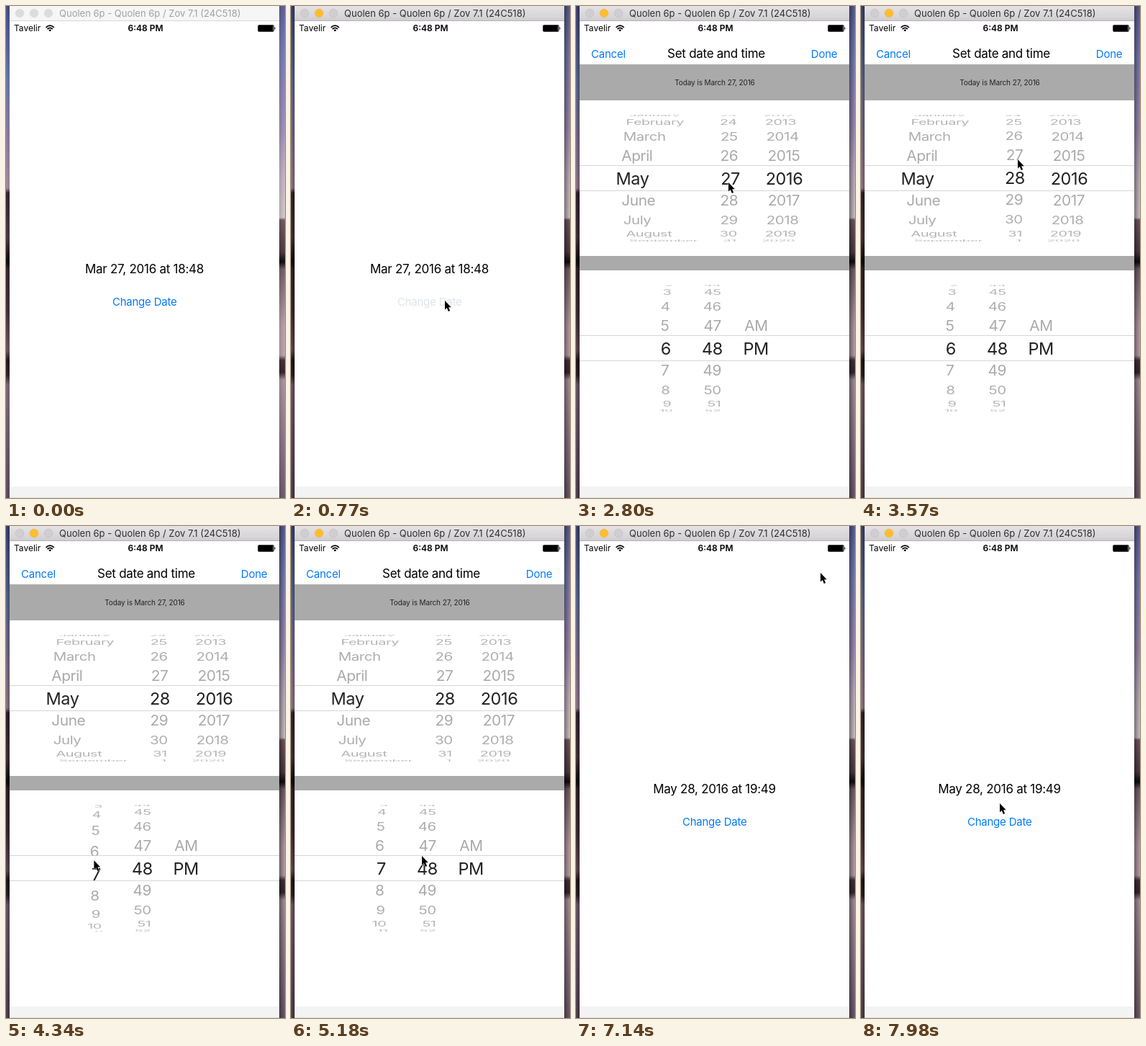
An HTML page that plays this animation: 388 px wide and 683 px high, repeating every 8000 ms.

```html
<!DOCTYPE html>
<html lang="en">
<head>
<meta charset="utf-8">
<title>Date and time picker</title>
<style>
  html, body { margin: 0; width: 100%; height: 100%; overflow: hidden; background: #fff; }
  svg { display: block; width: 388px; height: 683px; }
  text { font-family: Inter, Roboto, sans-serif; }
  .body { font-size: 17px; letter-spacing: -.27px; }
  .link { font-size: 15px; letter-spacing: -.22px; fill: #007aff; }
  .mid { text-anchor: middle; }
  .row { font-size: 21px; letter-spacing: -.45px; fill: #a8a8a8; }
  .picked { font-size: 23.5px; letter-spacing: -.4px; fill: #222; }
</style>
</head>
<body>
<svg viewBox="0 0 388 683">
  <defs>
    <linearGradient id="leftSky" x2="0" y2="1">
      <stop offset="0" stop-color="#4f5793"/>
      <stop offset=".15" stop-color="#7486bd"/>
      <stop offset=".27" stop-color="#a08bb4"/>
      <stop offset=".37" stop-color="#bb9bb0"/>
      <stop offset=".38" stop-color="#3a2a36"/>
      <stop offset=".47" stop-color="#57404c"/>
      <stop offset=".52" stop-color="#0e0b0f"/>
      <stop offset=".535" stop-color="#3c2a34"/>
      <stop offset=".62" stop-color="#4c3640"/>
      <stop offset=".7" stop-color="#7b5f6b"/>
      <stop offset=".72" stop-color="#261c22"/>
      <stop offset=".75" stop-color="#35272f"/>
      <stop offset=".77" stop-color="#8c7286"/>
      <stop offset="1" stop-color="#6a5468"/>
    </linearGradient>
    <linearGradient id="rightSky" x2="0" y2="1">
      <stop offset="0" stop-color="#6468a4"/>
      <stop offset=".1" stop-color="#8286c0"/>
      <stop offset=".25" stop-color="#ab97c3"/>
      <stop offset=".35" stop-color="#d2c0d0"/>
      <stop offset=".43" stop-color="#dfd2d6"/>
      <stop offset=".435" stop-color="#7b5f67"/>
      <stop offset=".5" stop-color="#554047"/>
      <stop offset=".52" stop-color="#100c10"/>
      <stop offset=".535" stop-color="#7d6670"/>
      <stop offset=".65" stop-color="#c4a9b3"/>
      <stop offset=".71" stop-color="#c8adb6"/>
      <stop offset=".72" stop-color="#49363d"/>
      <stop offset=".745" stop-color="#3a2a31"/>
      <stop offset=".76" stop-color="#b79da9"/>
      <stop offset="1" stop-color="#776176"/>
    </linearGradient>
    <linearGradient id="activeBar" x2="0" y2="1">
      <stop offset="0" stop-color="#e8e6e8"/>
      <stop offset="1" stop-color="#d1cfd1"/>
    </linearGradient>
    <linearGradient id="shadow">
      <stop offset="0" stop-opacity=".45"/>
      <stop offset="1" stop-opacity="0"/>
    </linearGradient>
  </defs>

  <rect width="6" height="683" fill="url(#leftSky)"/>
  <rect x="379" width="9" height="683" fill="url(#rightSky)"/>
  <g id="shade" fill="url(#shadow)">
    <rect x="380" width="10" height="683"/>
    <rect x="-5" width="10" height="683" transform="scale(-1 1)"/>
  </g>

  <rect x="5" y="20" width="375" height="663" fill="#fff"/>
  <rect id="bar" x="5" y="-4" width="375" height="25" rx="4"/>
  <rect x="5" y="17" width="375" height="3.5" id="barFoot"/>
  <path id="barLine" d="M5 20.5H380"/>
  <g id="dots">
    <circle cx="19" cy="10" r="5.8"/><circle cx="39" cy="10" r="5.8"/><circle cx="59" cy="10" r="5.8"/>
  </g>
  <text id="title" x="74" y="15" font-size="13">Quolen 6p - Quolen 6p / Zov 7.1 (24C518)</text>

  <text x="11" y="35.3" font-size="12">Tavelir</text>
  <path d="M55.6 29.8Q61.2 24.6 66.8 29.8M57.6 32Q61.2 28.7 64.8 32" fill="none" stroke="#000" stroke-width="1.7"/>
  <path d="M59.3 33.3Q61.2 31.8 63.1 33.3L61.2 35.4Z"/>
  <text class="mid" x="194" y="35.3" font-size="12" font-weight="600">6:48 PM</text>
  <rect x="350.5" y="26.5" width="22" height="9" rx="1.5" fill="none" stroke="#000" stroke-opacity=".75"/>
  <rect x="351" y="27" width="20.5" height="8" rx=".5"/>
  <path d="M373.5 29.2q2.4 1.8 0 3.6z"/>

  <g id="home">
    <text id="date" class="body mid" x="192.5" y="370.7"></text>
    <text id="change" class="link mid" x="192.7" y="415.8">Change Date</text>
  </g>

  <g id="picker">
    <text class="link" x="21" y="71.6">Cancel</text>
    <text class="body mid" x="195" y="72.2">Set date and time</text>
    <text id="done" class="link" x="326.8" y="71.6">Done</text>
    <path fill="#aaa" d="M5 81H380V131H5ZM5 347H380V367H5Z"/>
    <text class="mid" x="193" y="109.6" font-size="10" letter-spacing="-.1" fill="#222">Today is March 27, 2016</text>
    <path stroke="#d6d6d6" d="M5 221.5H380M5 256.5H380M5 457.5H380M5 492.5H380"/>
    <g id="wheels"></g>
  </g>

  <path fill="#f3f3f3" d="M5 667H380V683H5Z"/>
  <path stroke="#dedede" d="M5 682.5H380"/>
  <path id="cursor" d="M0 0V12.6L2.8 10 4.9 14.9 7.1 14 5.1 9.2H8.8Z" stroke="#fff" stroke-width="1" paint-order="stroke"/>
</svg>

<script>
const LOOP = 8000, STEP = 70;
const ACTIVATE = 770, OPEN = 980, DONE_PRESS = 6790, CLOSE = 7140;
const AXIS = 193, RADIUS = 88, PITCH = 20.6 * Math.PI / 180, BAND = 17.5;
const MONTHS = 'January February March April May June July August September October November December'.split(' ');

const $ = id => document.getElementById(id);
const set = (el, attrs) => { for (const k in attrs) el.setAttribute(k, attrs[k]); return el; };
const add = (parent, tag, attrs = {}) =>
  parent.appendChild(set(document.createElementNS('http://www.w3.org/2000/svg', tag), attrs));
const wrap = (n, size) => ((n % size) + size) % size;

// Linear track of [time, ...values], held at both ends.
function track(keys, t) {
  const i = keys.findIndex(k => k[0] > t);
  if (i < 0) return keys[keys.length - 1].slice(1);
  if (i === 0) return keys[0].slice(1);
  const a = keys[i - 1], b = keys[i], u = (t - a[0]) / (b[0] - a[0]);
  return a.slice(1).map((v, j) => v + (b[j + 1] - v) * u);
}

const cursorPath = [
  [0, 195, -15], [210, 225, 85], [350, 231, 235], [490, 221, 365], [630, 214, 409],
  [1260, 214, 409], [1540, 160, 350], [1820, 80, 270], [1960, 75, 262], [2100, 75, 204],
  [2380, 75, 204], [2590, 130, 228], [2800, 212, 245], [2940, 217, 245],
  [3430, 218, 213], [3570, 218, 213], [3780, 157, 420], [4060, 124, 489],
  [4410, 122, 458], [4690, 122, 458], [4970, 182, 466], [5110, 182, 466], [5180, 182, 458],
  [5460, 182, 432], [5530, 182, 432], [5810, 138, 538], [6020, 210, 400], [6230, 328, 170],
  [6370, 318, 103], [6440, 332, 83], [6650, 340, 65], [7490, 340, 65], [7980, 193, 385]
];

const wheels = [
  { cy: 239, x: 62.5, bigX: 55.5, anchor: 'start', label: n => MONTHS[wrap(n - 1, 12)],
    keys: [[1960, 3], [2100, 4.8], [2310, 4.8], [2520, 5]] },
  { cy: 239, x: 225.5, bigX: 228, anchor: 'end', label: n => wrap(n - 1, 31) + 1,
    keys: [[2940, 27], [3430, 28.05], [3570, 28.03], [3640, 28]] },
  { cy: 239, x: 289.5, bigX: 289.5, anchor: 'middle', label: n => n, keys: [[0, 2016]] },
  { cy: 475, x: 129, bigX: 132, anchor: 'end', label: n => wrap(n - 1, 12) + 1,
    keys: [[4060, 6], [4410, 6.95], [4760, 7]] },
  { cy: 475, x: 202, bigX: 204, anchor: 'end', label: n => String(wrap(n, 60)).padStart(2, '0'),
    keys: [[5180, 48], [5390, 48.9], [5460, 49]] },
  { cy: 475, x: 234.5, bigX: 232.5, anchor: 'start', label: n => ['AM', 'PM'][n] || '', keys: [[0, 1]] }
];

function clipGroup(id, d) {
  add(add($('wheels'), 'clipPath', { id }), 'path', { d });
  return add($('wheels'), 'g', { 'clip-path': `url(#${id})` });
}

wheels.forEach((w, i) => {
  const top = w.cy - RADIUS, low = w.cy + BAND;
  const h = RADIUS - BAND;
  const outer = clipGroup('drum' + i, `M5 ${top}h375v${h}h-375zM5 ${low}h375v${h}h-375z`);
  const inner = clipGroup('band' + i, `M5 ${w.cy - BAND}h375v${2 * BAND}h-375z`);
  const rows = (group, reach, cls, y) => Array.from({ length: 2 * reach + 1 }, (_, j) => ({
    k: j - reach, el: add(group, 'text', { class: cls, y, 'text-anchor': w.anchor })
  }));
  w.rows = rows(outer, 5, 'row', 7.6);
  w.picked = rows(inner, 1, 'picked', 8.6);
});

function drawWheel(w, t) {
  const [value] = track(w.keys, t), base = Math.round(value);
  for (const { k, el } of w.rows) {
    const angle = (base + k - value) * PITCH, c = Math.cos(angle);
    const visible = Math.abs(angle) < Math.PI / 2;
    el.textContent = visible ? w.label(base + k) : '';
    if (!visible) continue;
    const s = 1 - .1 * (1 - c);
    set(el, {
      transform: `translate(${AXIS + (w.x - AXIS) * s} ${w.cy + RADIUS * Math.sin(angle)}) scale(${s} ${c})`,
      opacity: .75 + .25 * c
    });
  }
  for (const { k, el } of w.picked) {
    el.textContent = w.label(base + k);
    set(el, { transform: `translate(${w.bigX} ${w.cy + (base + k - value) * 35})` });
  }
}

function drawWindow(active) {
  const fill = active ? 'url(#activeBar)' : '#f6f6f6';
  set($('bar'), { fill });
  set($('barFoot'), { fill: active ? '#d1cfd1' : '#f6f6f6' });
  set($('barLine'), { stroke: active ? '#b3b1b3' : '#d8d8d8' });
  set($('title'), { fill: active ? '#2e2e2e' : '#a0a0a0' });
  set($('shade'), { opacity: active ? 1 : .4 });
  [...$('dots').children].forEach((dot, i) => {
    const amber = active && i === 1;
    set(dot, {
      fill: amber ? '#fdbd2f' : active ? '#d0ced0' : '#dcdcdc',
      stroke: amber ? '#f0b233' : active ? '#bebcbe' : '#d8d8d8',
      'stroke-width': .6
    });
  });
}

function draw(now) {
  const t = Math.floor(now % LOOP / STEP) * STEP;
  const open = t >= OPEN && t < CLOSE;
  drawWindow(t >= ACTIVATE);
  set($('home'), { display: open ? 'none' : 'inline' });
  set($('picker'), { display: open ? 'inline' : 'none' });
  $('date').textContent = t < CLOSE ? 'Mar 27, 2016 at 18:48' : 'May 28, 2016 at 19:49';
  $('change').style.fill = t >= ACTIVATE && t < OPEN ? '#dfe3ea' : '';
  $('done').style.fill = t >= DONE_PRESS ? '#cce4ff' : '';
  if (open) wheels.forEach(w => drawWheel(w, t));
  set($('cursor'), { transform: `translate(${track(cursorPath, t)})` });
}

const start = performance.now();
function tick() {
  draw(performance.now() - start);
  requestAnimationFrame(tick);
}
tick();
</script>
</body>
</html>
```
